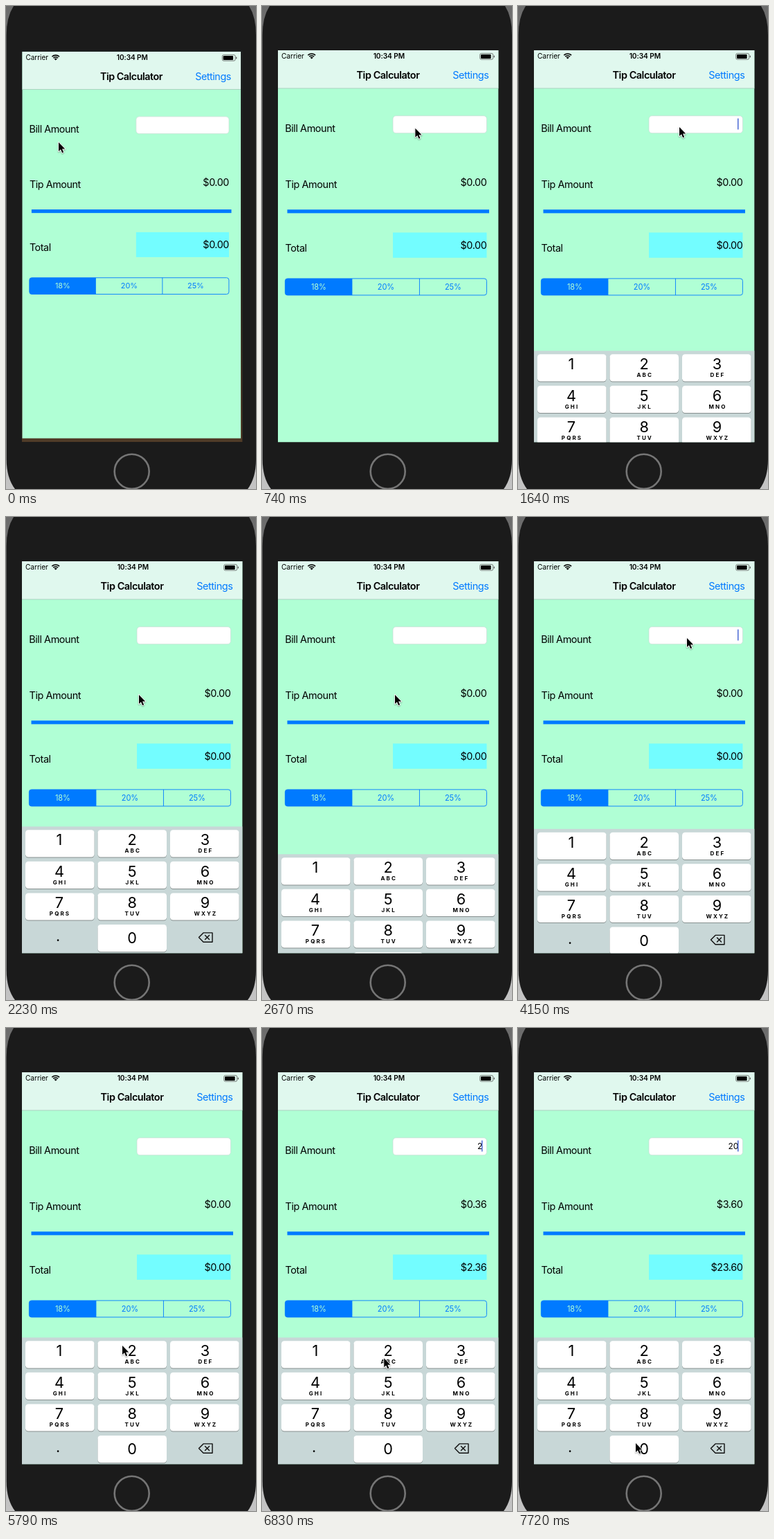
Animation, 361 px wide and 698 px high, one loop 8000 ms. Source, as an HTML page with a canvas:

```html
<!DOCTYPE html>
<html lang="en">
<head>
<meta charset="utf-8">
<title>Tip Calculator</title>
<style>
  html, body { margin: 0; width: 100%; height: 100%; overflow: hidden; background: #1b1b1b; }
  canvas { display: block; width: 361px; height: 698px; }
</style>
</head>
<body>
<canvas id="stage"></canvas>
<script>
const W = 361, H = 698, LOOP = 8000, TICK = 148.2;
const BLUE = '#007aff', MINT = '#b0ffd5', BODY = '#1b1b1b';
const FONT = 'Inter, Roboto, sans-serif';

const canvas = document.getElementById('stage');
const ctx = canvas.getContext('2d');
const ratio = window.devicePixelRatio || 1;
canvas.width = W * ratio;
canvas.height = H * ratio;

function text(str, x, y, { size = 14.45, weight = 400, color = '#000', align = 'left', gap = 0 } = {}) {
  ctx.font = `${weight} ${size}px ${FONT}`;
  ctx.letterSpacing = gap + 'px';
  ctx.textAlign = align;
  ctx.fillStyle = color;
  ctx.fillText(str, x, y);
}

const label = (str, x, y, opts) => text(str, x, y, { gap: -0.42, ...opts });

function box(x, y, w, h, color) {
  ctx.fillStyle = color;
  ctx.fillRect(x, y, w, h);
}

function round(x, y, w, h, r, fill, stroke, line = 1) {
  ctx.beginPath();
  ctx.roundRect(x, y, w, h, r);
  if (fill) { ctx.fillStyle = fill; ctx.fill(); }
  if (stroke) { ctx.strokeStyle = stroke; ctx.lineWidth = line; ctx.stroke(); }
}

function poly(points, close = true) {
  ctx.beginPath();
  points.forEach(([x, y]) => ctx.lineTo(x, y));
  if (close) ctx.closePath();
}

function fade(...stops) {
  const g = ctx.createLinearGradient(0, 0, 0, H);
  stops.forEach((color, i) => g.addColorStop(i / (stops.length - 1), color));
  return g;
}

// Pointer moves: first tick, last tick, target, optional bend point
const moves = [
  { a: 0, b: 6, to: [232, 174] },
  { a: 11, b: 15, to: [191, 256] },
  { a: 19, b: 24, to: [243, 174] },
  { a: 32, b: 37, to: [83, 462], via: [150, 340] },
  { a: 37, b: 39, to: [167, 458], via: [125, 472] },
  { a: 39, b: 40, to: [176, 461] },
  { a: 40, b: 41, to: [176, 462] },
  { a: 45, b: 50, to: [169, 599] }
];

function pointerAt(n) {
  let pos = [75, 196];
  for (const { a, b, to, via } of moves) {
    if (n <= a) break;
    const p = Math.min(1, (n - a) / (b - a));
    const e = p * p * (3 - 2 * p);
    pos = pos.map((from, i) => {
      const mid = via ? via[i] : (from + to[i]) / 2;
      return (1 - e) ** 2 * from + 2 * e * (1 - e) * mid + e * e * to[i];
    });
  }
  return pos;
}

// How far the keyboard is pushed down from its resting place
function keyboardDrop(n) {
  if (n < 11) return 190;
  if (n < 18) return [51, 4][n - 11] || 0;
  if (n < 28) return [40, 150, 178][n - 18] || 190;
  return n === 28 ? 3.5 : 0;
}

const caretSpans = [[11, 15], [28, 31], [34, 37], [40, 47], [50, 60]];
const caretOn = n => caretSpans.some(([a, b]) => n >= a && n < b);

function drawPhone() {
  box(0, 0, W, H, fade('#6c6c6c', '#8c8c8c', '#c4c4c4'));
  ctx.beginPath();
  ctx.moveTo(11, 0);
  ctx.quadraticCurveTo(0.7, 16, 0.7, 42);
  ctx.lineTo(0.7, 655);
  ctx.quadraticCurveTo(0.7, 682, 13, H);
  ctx.lineTo(349, H);
  ctx.quadraticCurveTo(361, 682, 361, 655);
  ctx.lineTo(361, 42);
  ctx.quadraticCurveTo(361, 16, 351, 0);
  ctx.closePath();
  ctx.fillStyle = BODY;
  ctx.fill();
  ctx.beginPath();
  ctx.arc(181.7, 672.7, 25, 0, 7);
  ctx.strokeStyle = '#757575';
  ctx.lineWidth = 2.6;
  ctx.stroke();
}

function drawStatus() {
  text('Carrier', 28, 76.4, { size: 10.2, gap: -0.08 });
  text('10:34 PM', 183.3, 76.4, { size: 10.2, weight: 600, align: 'center', gap: -0.1 });

  const arc = r => {
    ctx.beginPath();
    ctx.arc(71.7, 76.6, r, -Math.PI * 0.75, -Math.PI * 0.25);
  };
  ctx.strokeStyle = '#000';
  ctx.lineWidth = 1.7;
  for (const r of [4.8, 7.6]) { arc(r); ctx.stroke(); }
  arc(3);
  ctx.lineTo(71.7, 76.6);
  ctx.fillStyle = '#000';
  ctx.fill();

  round(314.7, 68.6, 19, 8.6, 2, null, '#555', 0.8);
  round(316, 69.9, 14.6, 6, 1, '#000');
  round(334.7, 71.4, 1.2, 3, 0.6, '#555');
}

function drawApp(n) {
  const bill = n < 44 ? 0 : n < 52 ? 2 : 20;
  const money = v => '$' + v.toFixed(2);
  const tip = bill * 0.18;

  box(23, 64, 319, 567, MINT);
  box(23, 64, 319, 55, '#e0f8ee');
  box(23, 118.6, 319, 0.8, '#a3c9b8');
  drawStatus();
  label('Tip Calculator', 182, 105, { weight: 600, align: 'center', gap: -0.47 });
  label('Settings', 327.4, 105, { color: BLUE, align: 'right' });

  label('Bill Amount', 33.2, 182);
  label('Tip Amount', 33.5, 263);
  label('Total', 33.5, 354.8);

  round(189, 158.7, 135.5, 25, 4.5, '#fff', '#c5dcd3', 0.7);
  if (bill) text(bill, 318.3, 175, { size: 11.9, align: 'right' });
  if (caretOn(n)) box(317, 162.5, 1.5, 16, '#4a69d4');

  label(money(tip), 324.4, 259.5, { align: 'right' });
  box(36.5, 294.2, 291.5, 5.2, BLUE);
  box(189, 327.4, 135.5, 36.4, '#73fdff');
  label(money(bill + tip), 324.4, 350.8, { align: 'right' });
  drawSegments();
}

function drawSegments() {
  const x = 33.4, y = 393.9, w = 291, h = 24, seg = w / 3;
  round(x, y, seg, h, [3.4, 0, 0, 3.4], BLUE);
  round(x, y, w, h, 3.4, null, BLUE, 0.9);
  box(x + seg * 2 - 0.45, y, 0.9, h, BLUE);
  ['18%', '20%', '25%'].forEach((str, i) =>
    text(str, x + seg * (i + 0.5), 409.8, { size: 11.05, color: i ? BLUE : MINT, align: 'center', gap: -0.07 }));
}

const keys = ['1', '2 ABC', '3 DEF', '4 GHI', '5 JKL', '6 MNO', '7 PQRS', '8 TUV', '9 WXYZ', '.', '0', '<'];

function drawKeyboard(n) {
  const drop = keyboardDrop(n);
  if (drop >= 184) return;
  const down = n === 43 ? '2' : n === 51 ? '0' : '';
  ctx.save();
  ctx.translate(0, drop);
  box(23, 447.3, 319, 184, '#c8d7d7');
  keys.forEach((key, i) => {
    const [digit, letters] = key.split(' ');
    const col = i % 3;
    const x = 28 + col * 104.5, y = 452.2 + Math.floor(i / 3) * 45.6;
    const mid = 77 + col * 105.2;
    if (digit === '<') return drawBackspace(mid + 1.6, y + 18.6);
    if (digit === '.') return text('.', mid - 2, y + 24, { size: 21.5, align: 'center' });
    round(x, y + 1, 99.5, 39.2, 4.2, '#87908f');
    round(x, y, 99.5, 39.2, 4.2, digit === down ? '#bcc9cb' : '#fff');
    text(digit, mid, y + (digit === '0' ? 27.2 : 21.9), { size: 21.7, align: 'center' });
    if (letters) text(letters, mid + 1, y + 33, { size: 8, weight: 700, align: 'center', gap: 2.1 });
  });
  ctx.restore();
}

function drawBackspace(x, y) {
  ctx.save();
  ctx.translate(x, y);
  ctx.lineJoin = ctx.lineCap = 'round';
  ctx.strokeStyle = '#111';
  ctx.lineWidth = 1.4;
  poly([[-10.5, 0], [-4, -6.7], [9, -6.7], [9, 6.7], [-4, 6.7]]);
  ctx.stroke();
  for (const s of [1, -1]) {
    poly([[-1.5, -3 * s], [4.5, 3 * s]], false);
    ctx.stroke();
  }
  ctx.restore();
}

function drawPointer([x, y]) {
  ctx.save();
  ctx.translate(x + 1, y + 1);
  ctx.scale(0.87, 0.87);
  poly([[0, 0], [0, 15], [3.4, 11.9], [5.9, 17.4], [8.2, 16.4], [5.8, 11], [10.6, 11]]);
  ctx.lineJoin = 'round';
  ctx.lineWidth = 2;
  ctx.strokeStyle = '#fff';
  ctx.shadowColor = 'rgba(0,0,0,0.35)';
  ctx.shadowBlur = 2 * ratio;
  ctx.shadowOffsetY = ratio;
  ctx.stroke();
  ctx.shadowColor = 'transparent';
  ctx.fillStyle = '#000';
  ctx.fill();
  ctx.restore();
}

function draw(now) {
  const n = Math.floor((now % LOOP + 8) / TICK);
  const launching = n === 0;
  ctx.setTransform(ratio, 0, 0, ratio, 0, 0);
  drawPhone();
  box(23, 64, 318.3, 566, fade('#1c2022', '#24241f', '#5a4029'));
  ctx.save();
  ctx.beginPath();
  if (launching) ctx.rect(23, 64, 316, 560.7);
  else ctx.rect(23, 64, 318.3, 566.3);
  ctx.clip();
  if (launching) {
    // Tail of the launch zoom
    ctx.translate(75, 275);
    ctx.scale(0.99, 0.99);
    ctx.translate(-75, -275);
  }
  drawApp(n);
  drawKeyboard(n);
  ctx.restore();
  drawPointer(pointerAt(n));
}

const start = performance.now();
function frame() {
  draw(performance.now() - start);
  requestAnimationFrame(frame);
}
frame();
</script>
</body>
</html>
```
